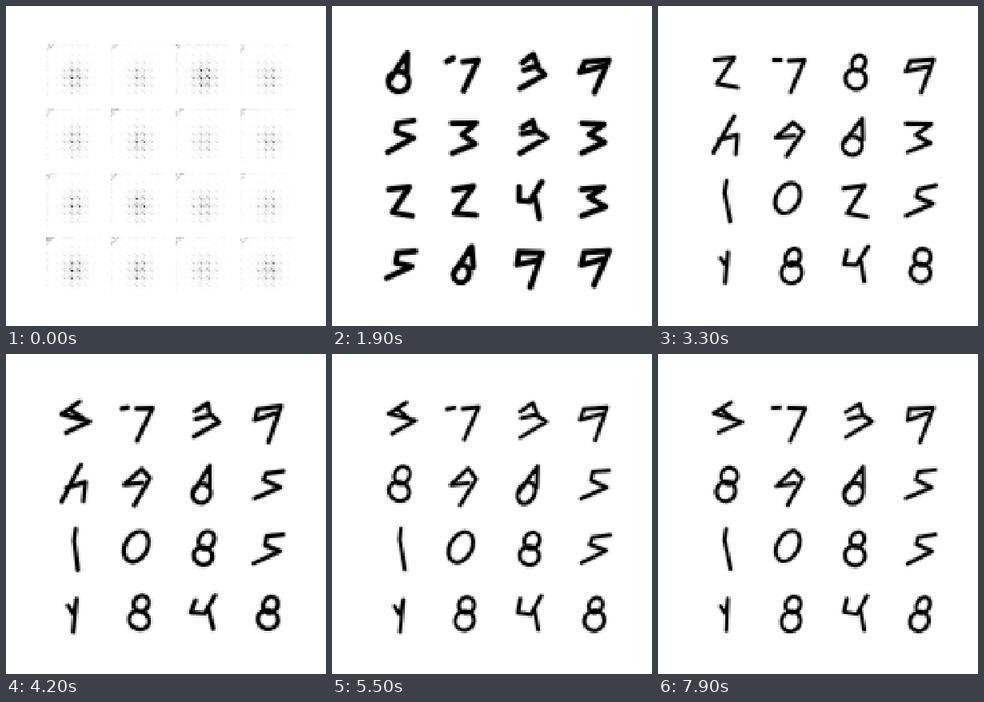
Recreate the animation shown at these times as an HTML page with a canvas. Size 400 by 400 pixels, loop 8 s.

```html
<!DOCTYPE html>
<html lang="en">
<head>
<meta charset="utf-8">
<title>Generated digits</title>
<style>
html, body { margin: 0; width: 100%; height: 100%; overflow: hidden; background: #fff; }
canvas { display: block; }
</style>
</head>
<body>
<canvas id="stage" width="400" height="400"></canvas>
<script>
const LOOP = 8000, STEP = 100, SIDE = 28, SIZE = 67, SCALE = SIDE / SIZE;
const clamp = v => Math.max(0, Math.min(1, v));
const rand = n => { const v = Math.sin(n * 12.9898) * 43758.5453; return v - Math.floor(v); };

// What the sixteen cells resemble at each key time, row by row.
const poses = [
  { at: 0 },
  { at: 1900, rows: '67s9 53s3 2243 5699', width: 6.8 },
  { at: 3300, rows: '2789 kq63 1025 t848', width: 4.9 },
  { at: 4200, rows: 'a7s9 kq65 1085 t848', width: 5.2 },
  { at: 5500, rows: 'a7s9 8q65 1085 t848', width: 4.6 },
  { at: 6600, rows: 'a7s9 8q65 1085 t848', width: 4.3 },
  { at: 7900, rows: 'a7s9 8q65 1085 t848', width: 4.6 }
];

// Skeletons in a 67-unit cell: p.line joins points, p.loop is a leaning oval.
const glyphs = {
  0: p => p.loop(31, 32, 13, 20),
  1: p => p.line(36, 10, 34, 24, 41, 60),
  2: p => p.line(20, 20, 46, 16, 24, 50, 50, 54),
  3: p => p.line(18, 20, 48, 18, 30, 32, 48, 44, 18, 54),
  4: p => p.line(24, 18, 20, 34, 36, 36, 50, 12).line(42, 30, 47, 55),
  5: p => p.line(54, 17, 32, 20, 30, 30, 50, 38, 18, 53),
  6: p => p.line(20, 46, 44, 12, 44, 38).loop(32, 45, 11, 13),
  7: p => p.line(13, 20, 22, 19).line(32, 20, 52, 19, 34, 60),
  8: p => p.loop(38, 24, 9, 11).loop(35, 44, 12, 12),
  9: p => p.line(44, 27, 18, 34, 22, 20, 52, 18, 36, 61),
  q: p => p.line(40, 34, 18, 36, 38, 16, 50, 28, 30, 60),
  k: p => p.line(44, 10, 20, 56).line(26, 40, 48, 32, 48, 56),
  a: p => p.line(42, 12, 20, 26, 54, 36, 26, 50).line(32, 22, 46, 34),
  s: p => p.line(24, 24, 40, 14, 44, 28, 26, 32).line(44, 28, 56, 36, 24, 56),
  t: p => p.line(28, 26, 36, 36, 38, 18, 35, 58)
};

// A path whose points are each a little off, as an untrained hand would put them.
class Sketch {
  constructor(seed, rough) {
    this.path = new Path2D();
    this.off = v => v + (rand(seed++) - .5) * rough;
  }
  line(...points) {
    const p = points.map(this.off);
    this.path.moveTo(p[0], p[1]);
    for (let i = 2; i < p.length; i += 2) this.path.lineTo(p[i], p[i + 1]);
    return this;
  }
  loop(...oval) {
    const [x, y, rx, ry] = oval.map(this.off), tilt = .5;
    this.path.moveTo(x + rx * Math.cos(tilt), y + rx * Math.sin(tilt));
    this.path.ellipse(x, y, rx, ry, tilt, 0, Math.PI * 2);
    return this;
  }
}

for (const [k, pose] of poses.entries()) {
  if (!pose.rows) continue;
  pose.paths = [...pose.rows.replaceAll(' ', '')].map((name, i) =>
    glyphs[name](new Sketch(k * 500 + i * 30, k === 1 ? 4 : 2.5)).path);
}

const ctx = stage.getContext('2d');
ctx.imageSmoothingEnabled = false;
const tile = document.createElement('canvas');
tile.width = tile.height = SIDE;
const pen = tile.getContext('2d');
pen.lineCap = pen.lineJoin = 'round';

// Untrained output: dots every four pixels, strongest near the middle.
function drawGrid(index, alpha) {
  const strength = index === 2 ? 1.1 : .5 + .3 * rand(index + 1);
  for (let y = 0; y < SIDE; y++) for (let x = 0; x < SIDE; x++) {
    const r = rand(index * 800 + y * SIDE + x);
    const near = Math.exp(-(((x - 14.5) / 5) ** 2) - ((y - 16.5) / 6.5) ** 2);
    const onX = x % 4 === 1, onY = y % 4 === 1;
    let ink = near * .14 * r;
    if (onX && onY) ink += near * (.35 + .65 * r) + .03;
    else if (x % 4 === 0 && y % 4 === 0) ink += near * .3 + .02;
    else if (onX || onY) ink += near * .12;
    if (x + y < 4) ink += .3 * r;
    if ((!x || !y) && r > .5) ink += .05;
    pen.globalAlpha = clamp(ink * strength * alpha);
    pen.fillRect(x, y, 1, 1);
  }
}

function drawDigit(index, pose, alpha, seed, wobble, extra) {
  const shift = n => (rand(seed + n) - .5) * wobble * SCALE;
  pen.setTransform(SCALE, 0, 0, SCALE, shift(0), shift(7));
  const stroke = (width, opacity) => {
    pen.lineWidth = width + extra;
    pen.globalAlpha = opacity;
    pen.stroke(pose.paths[index]);
  };
  stroke(pose.width + 4, alpha * .12);
  stroke(pose.width, alpha);
  pen.setTransform(1, 0, 0, 1, 0, 0);
}

function draw(time) {
  const k = poses.findLastIndex(pose => pose.at <= time);
  const from = poses[k], to = poses[k + 1];
  const f = to ? (time - from.at) / (to.at - from.at) : 0;
  const mix = f * f * (3 - 2 * f), wobble = 10 * f * (1 - f);
  ctx.fillStyle = '#fff';
  ctx.fillRect(0, 0, 400, 400);
  for (let i = 0; i < 16; i++) {
    const seed = time / STEP * 16 + i;
    pen.clearRect(0, 0, SIDE, SIDE);
    if (k === 0) {
      if (f < .25) drawGrid(i, 1 - f * 4);
      if (f > 0) drawDigit(i, to, clamp(.3 + f * 1.1), seed, wobble, 9 * (1 - f) ** 2);
    } else {
      drawDigit(i, from, clamp((1 - mix) * 1.35), seed, wobble, 0);
      if (f > 0) drawDigit(i, to, clamp(mix * 1.35), seed, wobble, 0);
    }
    ctx.drawImage(tile, 50.2 + i % 4 * 80.87, 48 + (i >> 2) * 80.35, SIZE, SIZE);
  }
}

const start = performance.now();
function tick() {
  const time = (performance.now() - start) % LOOP;
  draw(Math.floor(time / STEP) * STEP);
  requestAnimationFrame(tick);
}
tick();
</script>
</body>
</html>
```
